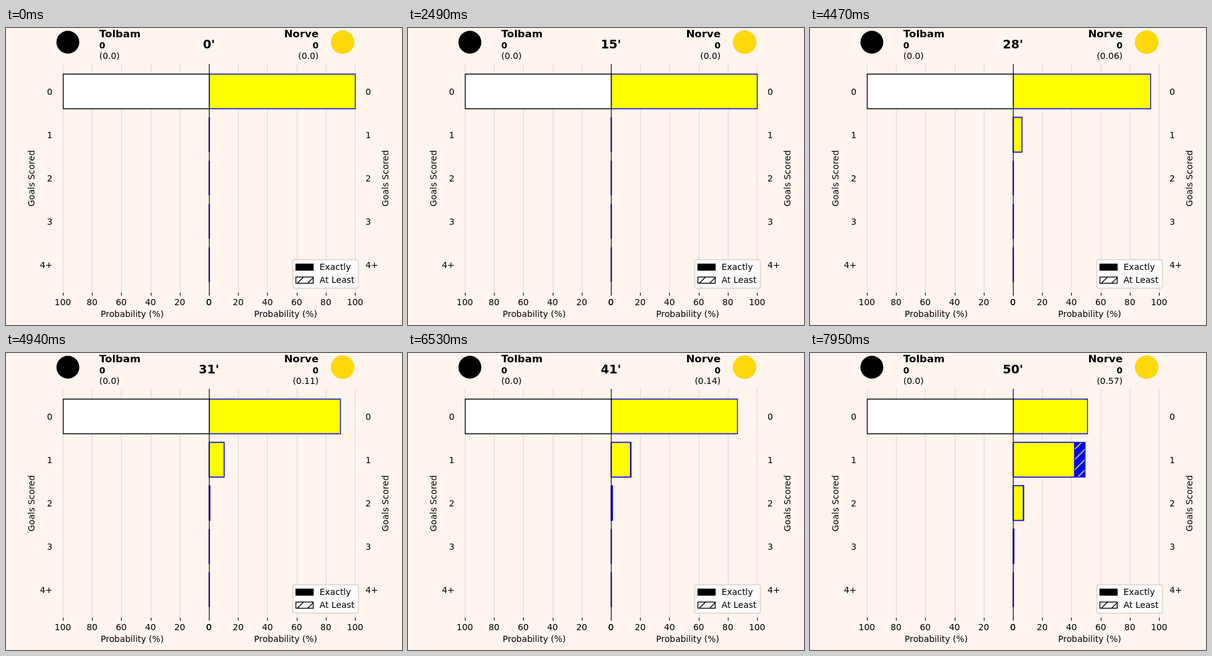
An HTML page that plays this animation: 640 px wide and 480 px high, repeating every 8000 ms.

```html
<!DOCTYPE html>
<html lang="en">
<head>
<meta charset="utf-8">
<title>Goal probabilities</title>
<style>
html, body { margin: 0; width: 100%; height: 100%; overflow: hidden; background: #fff4ee; }
svg { display: block; }
text { font: 13.89px "DejaVu Sans", sans-serif; }
.bold { font-weight: bold; }
.name { font-size: 16.67px; }
.clock { font-size: 19.44px; }
</style>
</head>
<body>
<svg id="stage" width="640" height="480" viewBox="0 0 640 480">
  <defs>
    <pattern id="hatchYellow" width="100" height="100" patternUnits="userSpaceOnUse">
      <rect width="100" height="100" fill="#00f"/>
      <path class="hatch" stroke="#ff0" stroke-width="1.39"/>
    </pattern>
    <pattern id="hatchBlack" width="100" height="100" patternUnits="userSpaceOnUse">
      <rect width="100" height="100" fill="#fff"/>
      <path class="hatch" stroke="#000" stroke-width="1.39"/>
    </pattern>
  </defs>
  <circle cx="100" cy="23" r="18.5"/>
  <circle cx="544" cy="23" r="19" fill="#ffd80c"/>
</svg>
<script>
const stage = document.getElementById("stage");
const MID = 328, SCALE = 236.19, ROWS = 5, LOOP = 8000;
const shots = [[18, .06], [30, .046], [33, .036], [42, .038], [47, .388]]; // minute, chance

function add(tag, attrs, content = "") {
  const el = document.createElementNS("http://www.w3.org/2000/svg", tag);
  for (const key in attrs) el.setAttribute(key, attrs[key]);
  el.textContent = content;
  return stage.appendChild(el);
}
const label = (x, y, content, anchor = "middle", attrs = {}) =>
  add("text", { x, y, "text-anchor": anchor, ...attrs }, content);
const line = (d, stroke) => add("path", { d, stroke, "stroke-width": 1.11 });
const bar = (fill, stroke) => add("path", { fill, stroke, "stroke-width": 1.39 });
const setBar = (el, row, share) => {
  const w = Math.round(MID + SCALE * share) - MID;
  el.setAttribute("d", `M328.5 ${74.5 + 70 * row}h${w}v56h${-w}z`);
};

let hatch = "";
for (let k = 0; k <= 12; k++) hatch += `M-5 ${k * 100 / 6 + 5}L${k * 100 / 6 + 5} -5`;
for (const el of document.querySelectorAll(".hatch")) el.setAttribute("d", hatch);

// Grid, ticks and percentages on both sides
for (const side of [-1, 1]) {
  for (let k = 0; k <= 5; k++) {
    const x = MID + side * SCALE * k / 5, snapped = Math.round(x) + .5;
    line(`M${snapped} 58V428`, "rgba(176,176,176,.4)");
    line(`M${snapped} 428V432.5`, "#000");
    label(x, 448, k * 20);
  }
  label(MID + side * 124, 467, "Probability (%)");
  const x = side < 0 ? 46 : 618;
  label(x, 243, "Goals Scored", "middle", { transform: `rotate(-90 ${x} 243)` });
}

const atLeast = [], exactly = [];
for (let row = 0; row < ROWS; row++) {
  atLeast.push(bar("url(#hatchYellow)", "#00f"));
  exactly.push(bar("#ff0", "#00f"));
  setBar(bar("#fff", "#000"), row, row ? 0 : -1);
  const name = row < 4 ? row : "4+", y = 108 + 70 * row;
  label(75.1, y, name, "end");
  label(580.9, y, name, "start");
}
line("M328.5 58V428", "#000");

// Legend
add("rect", { x: 463.5, y: 374.5, width: 106, height: 46, rx: 2.8,
  fill: "#fff", stroke: "#ccc", "stroke-width": 1.39, opacity: .8 });
["Exactly", "At Least"].forEach((name, i) => {
  add("rect", { x: 468.5, y: 381.5 + 21 * i, width: 28, height: 10,
    fill: i ? "url(#hatchBlack)" : "#000", stroke: "#000", "stroke-width": 1.39 });
  label(506.8, 391 + 21 * i, name, "start");
});

// Scoreboard
label(150.8, 15, "Tolbam", "start", { class: "bold name" });
label(505.2, 15, "Norve", "end", { class: "bold name" });
label(150.8, 33, "0", "start", { class: "bold" });
label(505.2, 33, "0", "end", { class: "bold" });
label(150.8, 50, "(0.0)", "start");
const expected = label(505.2, 50, "", "end");
const clock = label(MID, 33, "", "middle", { class: "bold clock" });

// Chance of 0, 1, 2, 3 and 4+ goals
function goalChances(chances) {
  const d = [1, 0, 0, 0, 0];
  for (const p of chances)
    for (let k = 4; k >= 0; k--) d[k] = d[k] * (k < 4 ? 1 - p : 1) + (k ? d[k - 1] * p : 0);
  return d;
}

function draw(time) {
  // A minute with a shot is split into five short steps
  let minute = 0, left = time % LOOP, length;
  const hasShot = () => shots.some(([m]) => m === minute);
  while (left >= (length = hasShot() ? 150 : 160)) {
    left -= length;
    minute++;
  }
  const progress = (Math.floor(left / 30) + 1) / 5;
  const taken = shots.filter(([m]) => m <= minute);
  const total = taken.reduce((sum, [, p]) => sum + p, 0);
  const chances = goalChances(taken.map(([m, p]) => m === minute ? p * progress : p));

  clock.textContent = minute + "'";
  expected.textContent = `(${total ? total.toFixed(2) : "0.0"})`;
  let sum = 0;
  for (let row = ROWS - 1; row >= 0; row--) {
    sum += chances[row];
    setBar(exactly[row], row, chances[row]);
    setBar(atLeast[row], row, row ? sum : 0);
  }
}

const began = performance.now();
function tick() {
  draw(performance.now() - began);
  requestAnimationFrame(tick);
}
tick();
</script>
</body>
</html>
```
